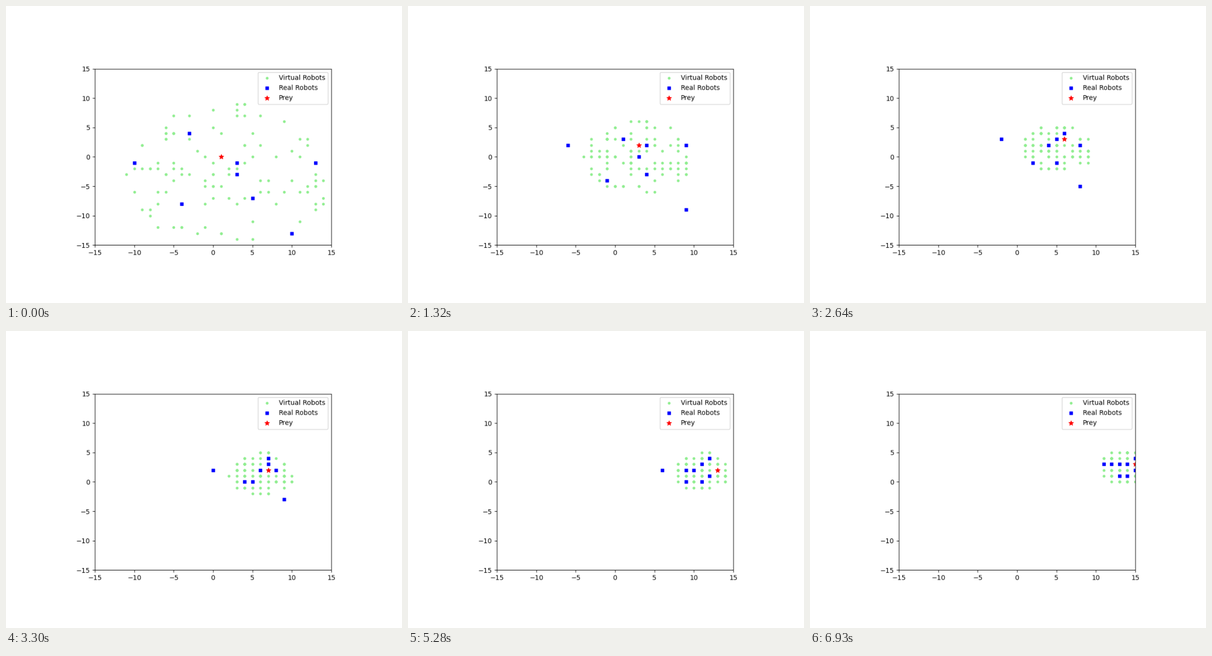
A matplotlib script that plays this animation: 640x480 px, repeating every 8920 ms.

```python
import matplotlib.pyplot as plt
import numpy as np
from matplotlib.animation import FuncAnimation

STEP, LOOP, TICK = 330, 8920, 40   # ms per move, per loop, per drawn frame
LAST = 21                          # moves until the prey is caught
EDGE = 15

PREY_KEYS = [0, 6, 12, 16, 21]
PREY = [(1, 0), (4, 3), (9, 2), (13, 2), (15, 3)]
ROBOT_KEYS = [0, 6, 12, 21]
ROBOTS = [
    [(-10, -1), (-4, 3), (2, 2), (11, 3)],
    [(-3, 4), (3, 3), (9, 4), (15, 4)],
    [(3, -1), (4, 4), (9, 3), (14, 3)],
    [(3, -3), (3, 2), (7, 2), (13, 3)],
    [(13, -1), (7, 3), (9, 1), (15, 2)],
    [(-4, -8), (0, -2), (6, 1), (12, 3)],
    [(5, -7), (4, -1), (6, 0), (13, 1)],
    [(10, -13), (8, -7), (9, -1), (14, 1)],
]

# Fixed random places in a unit swarm, denser near the middle
rng = np.random.default_rng(4)
angle = rng.uniform(0, 2 * np.pi, 110)
radius = 2.2 * rng.uniform(0, 1, 110) ** 0.7
PLACES = np.column_stack([radius * np.cos(angle),
                          0.9 * radius * np.sin(angle)])


def to_grid(p):
    return np.floor(np.asarray(p) + 0.5)


def along(keys, path, step):
    """Grid cell reached on a path of waypoints."""
    return to_grid([np.interp(step, keys, axis) for axis in zip(*path)])


def positions(step):
    prey = along(PREY_KEYS, PREY, step)
    robots = np.array([along(ROBOT_KEYS, path, step) for path in ROBOTS])
    centre = (2 * robots.mean(axis=0) + prey) / 3
    spread = 1.4 + 4.8 * np.exp(-step / 4)
    low, high = (1 - EDGE, EDGE - 1) if step < LAST - 2 else (-EDGE, EDGE)
    virtual = np.clip(to_grid(centre + spread * PLACES), low, high)
    return virtual, robots, [prey]


fig = plt.figure(figsize=(6.4, 4.8), dpi=100)


def render_plots():
    """Draw the full-size plot for every move and keep the pictures."""
    ax = fig.add_subplot(xlim=(-EDGE, EDGE), ylim=(-EDGE, EDGE))
    styles = [("Virtual Robots", 10, "lightgreen", "o"),
              ("Real Robots", 20, "blue", "s"),
              ("Prey", 50, "red", "*")]
    groups = [ax.scatter([], [], s=size, c=color, marker=marker, label=label)
              for label, size, color, marker in styles]
    ax.legend(loc="upper right")
    pictures = []
    for step in range(LAST + 1):
        for group, cells in zip(groups, positions(step)):
            group.set_offsets(cells)
        fig.canvas.draw()
        pictures.append(np.array(fig.canvas.buffer_rgba()))
    fig.clear()
    return pictures


# The plot is shown as a smaller picture inside the same figure
pictures = render_plots()
view = fig.add_subplot()
view.axis("off")
image = view.imshow(pictures[0])


def update(i):
    step = min((i * TICK + TICK - 1) // STEP, LAST)
    image.set_data(pictures[step])
    return [image]


anim = FuncAnimation(fig, update, frames=LOOP // TICK, interval=TICK,
                     repeat=True, repeat_delay=0, blit=False)
plt.show()
```
